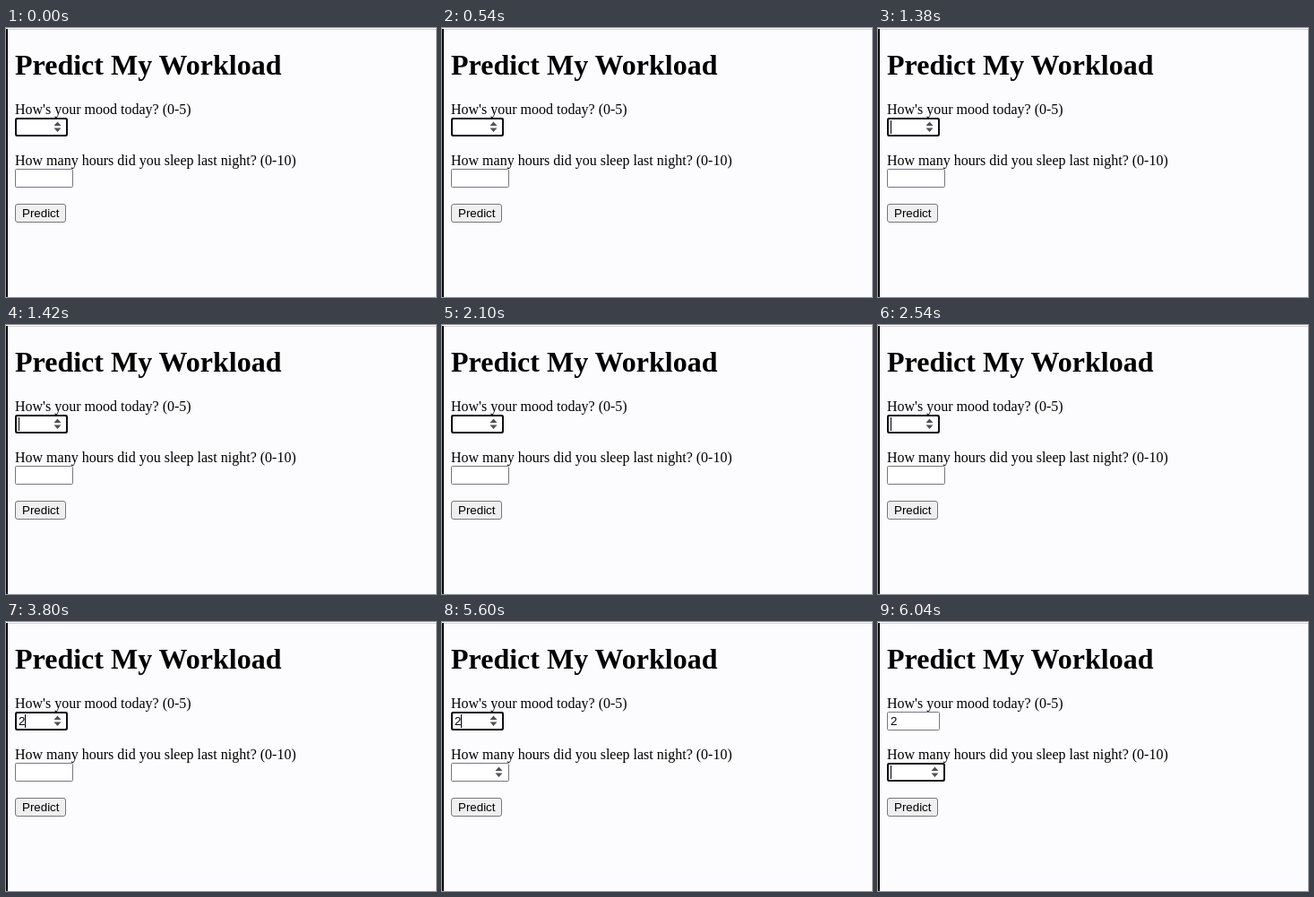
Recreate the animation shown at these times as an HTML page. Size 480x300 px, loop 8000 ms.

```html
<!DOCTYPE html>
<html lang="en">
<head>
<meta charset="utf-8">
<title>Predict My Workload</title>
<style>
  html, body { margin: 0; width: 100%; height: 100%; overflow: hidden; background: #fcfcfe; }
  svg { display: block; width: 480px; height: 300px; }
  .page { font: 16px "Liberation Serif", Tinos, serif; }
  .page .title { font-size: 32px; font-weight: bold; }
  .control { font: 13.333px "Liberation Sans", Arimo, sans-serif; }
  .box { fill: #fff; stroke: #767680; stroke-width: 1; }
  .ring { fill: none; stroke: #101014; stroke-width: 2; }
  .arrows { fill: #505054; }
</style>
</head>
<body>
<svg viewBox="0 0 480 300">
  <rect width="480" height="300" fill="#fcfcfe"/>
  <rect y="1" width="480" height="1" fill="#d3d3d8"/>
  <rect y="1" width="2" height="299" fill="#0c0408"/>
  <g class="page">
    <text class="title" x="10" y="52">Predict My Workload</text>
    <text x="10" y="96">How's your mood today? (0-5)</text>
    <text x="10" y="153">How many hours did you sleep last night? (0-10)</text>
  </g>
  <g id="fields" class="control"></g>
  <g class="control">
    <rect class="box" x="10.5" y="196.5" width="56" height="20" rx="2.5" style="fill:#efeff0"/>
    <text x="18" y="211">Predict</text>
  </g>
</svg>
<script>
const LOOP = 8000;
const fields = document.getElementById('fields');

function makeField(top, width) {
  const group = document.createElementNS('http://www.w3.org/2000/svg', 'g');
  group.setAttribute('transform', `translate(10 ${top})`);
  group.innerHTML = `
    <rect class="box" x=".5" y=".5" width="${width - 1}" height="20" rx="1"/>
    <rect class="ring" x="1" y="1" width="${width - 2}" height="19" rx="2"/>
    <path class="arrows" transform="translate(${width - 11.5} 0)"
      d="M-4 9L0 4.5L4 9zM-4 11.5L0 16L4 11.5z"/>
    <text class="value" x="4" y="15"></text>
    <rect class="caret" y="3" width="1" height="15"/>`;
  fields.append(group);
  const part = name => group.querySelector('.' + name);
  const show = (name, on) => part(name).setAttribute('visibility', on ? 'visible' : 'hidden');
  return ({ focus, spinner, caret, value = '' }) => {
    show('ring', focus);
    show('arrows', spinner);
    show('caret', caret);
    part('value').textContent = value;
    part('caret').setAttribute('x', value ? 11 : 4);
  };
}

const drawMood = makeField(100, 59);
const drawSleep = makeField(157, 65);

function draw(t) {
  const within = (from, to) => t >= from && t < to;
  const onSleep = t >= 6040;
  drawMood({
    focus: !onSleep,
    spinner: !onSleep,
    caret: within(20, 540) || within(1380, 2100) || within(2540, 5760),
    value: t >= 3800 ? '2' : ''
  });
  drawSleep({ focus: onSleep, spinner: t >= 5600, caret: onSleep });
}

const start = performance.now();
function tick() {
  draw((performance.now() - start) % LOOP);
  requestAnimationFrame(tick);
}
tick();
</script>
</body>
</html>
```
